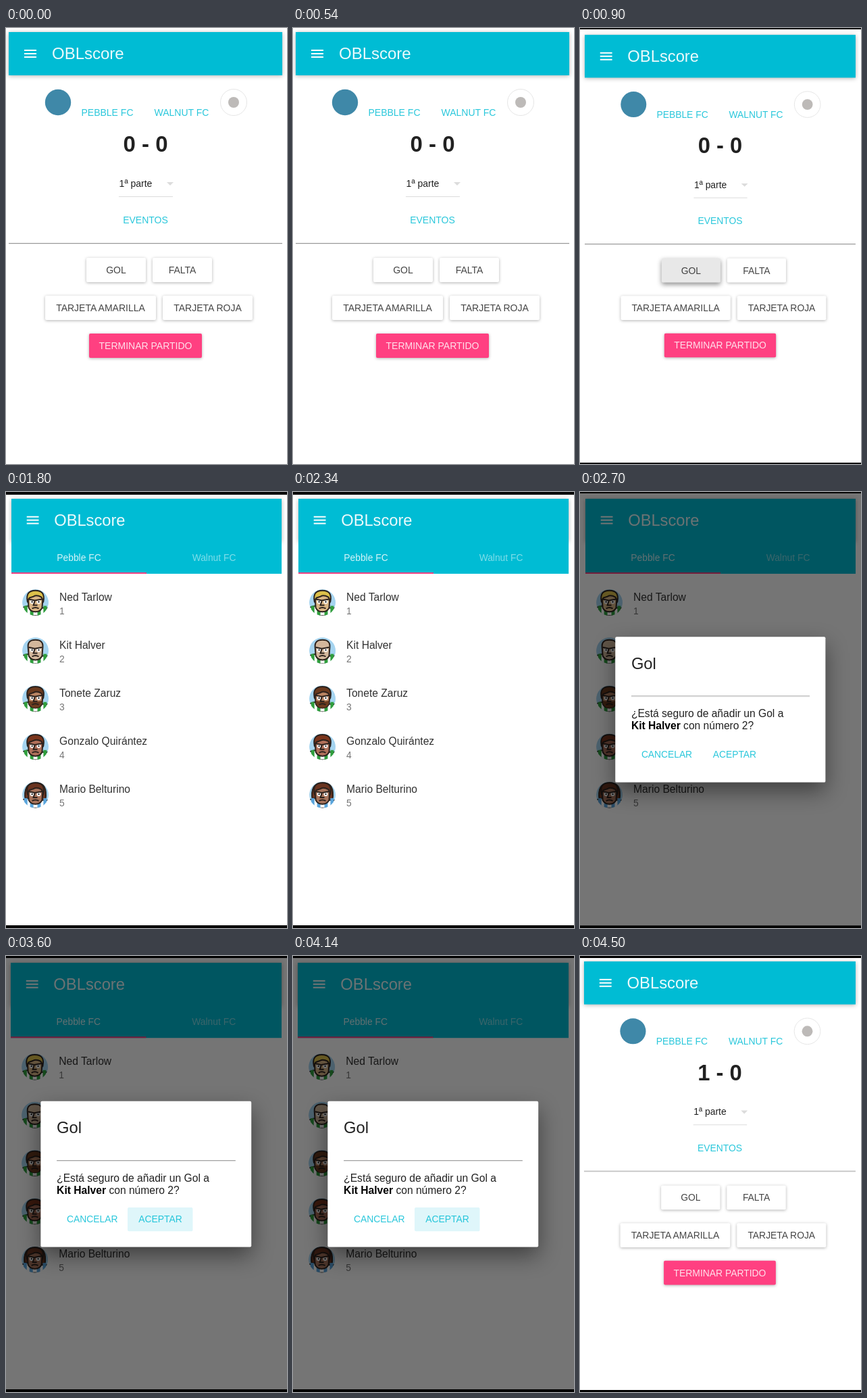
These frames come from a looping animation (416 px wide and 645 px high, 5.4 s). An HTML page:

```html
<!DOCTYPE html>
<html lang="es">
<head>
<meta charset="utf-8">
<title>Marcador</title>
<style>
  html, body { margin: 0; width: 100%; height: 100%; overflow: hidden; background: #fff; }
  svg { display: block; width: 416px; height: 645px; font-family: "Liberation Sans", Arial, sans-serif; }
  .bar { filter: drop-shadow(0 1px 3px rgba(0,0,0,.3)); }
  .raised { filter: drop-shadow(0 1px 2px rgba(0,0,0,.3)); }
  .pressed { filter: drop-shadow(0 3px 4px rgba(0,0,0,.45)); }
  .dialog { filter: drop-shadow(0 13px 16px rgba(0,0,0,.45)); }
  .thin { fill-opacity: .84; }
  .dim { fill-opacity: .5; }
</style>
</head>
<body>
<svg id="stage" viewBox="0 0 416 645"></svg>
<script>
const CYAN = '#00bcd4', PINK = '#ff4081', INK = '#212121';
const LOOP = 5400, HOLD = 900;
const APP = 'OBLscore', TEAMS = ['Pebble FC', 'Walnut FC'];

const players = [
  { name: 'Ned Tarlow', skin: '#d9b585', hair: '#dcc04a', style: 'fringe' },
  { name: 'Kit Halver', skin: '#d3b79c', style: 'bald' },
  { name: 'Tonete Zaruz', skin: '#b98462', hair: '#6b3a1e', style: 'beard' },
  { name: 'Gonzalo Quirántez', skin: '#b0705a', hair: '#7a351c', style: 'fringe' },
  { name: 'Mario Belturino', skin: '#a8745c', hair: '#6a3420', style: 'long', shirt: '#5aa5dc' },
];

const rect = (x, y, w, h, fill, more = '') =>
  `<rect x="${x}" y="${y}" width="${w}" height="${h}" fill="${fill}" ${more}/>`;
const circle = (x, y, r, fill, more = '') =>
  `<circle cx="${x}" cy="${y}" r="${r}" fill="${fill}" ${more}/>`;
const path = (d, fill, more = '') => `<path d="${d}" fill="${fill}" ${more}/>`;
const text = (x, y, size, fill, label, more = '') =>
  `<text x="${x}" y="${y}" font-size="${size}" fill="${fill}" ${more}>${label}</text>`;
const centred = (x, y, label, fill, size = 14, more = 'class="thin"') =>
  text(x, y, size, fill, label, 'text-anchor="middle" ' + more);

const rule = (x, y, w) => rect(x, y, w, 1, '#999') + rect(x, y + 1, w, 1, '#e6e6e6');

const button = (x, y, w, label, fill = '#fff', ink = INK, cls = 'raised') =>
  rect(x, y, w, 36, fill, `rx="2" class="${cls}"`) + centred(x + w / 2, y + 23, label, ink);

const appBar = () =>
  rect(4, 6, 405, 64, CYAN, 'class="bar"') +
  [32, 37, 42].map(y => rect(27, y, 18, 2, '#fff')).join('') +
  text(68, 46, 24, '#fff', APP, 'fill-opacity=".92"');

function matchScreen({ goals, pressed }) {
  return appBar() +
    circle(77, 110, 19.2, '#3f88a8') +
    circle(337, 110, 19.5, '#fff', 'stroke="#e6e6e6"') + circle(337, 110, 8, '#bdbab8') +
    centred(150, 130, TEAMS[0].toUpperCase(), CYAN) +
    centred(260, 130, TEAMS[1].toUpperCase(), CYAN) +
    centred(206.5, 183, goals + ' - 0', INK, 33, 'font-weight="bold"') +
    text(167.6, 235, 14, INK, '1ª parte') +
    path('M238 228h10l-5 5z', '#dcdcdc') +
    rect(167, 249, 80, 1, '#dcdcdc') +
    centred(206.5, 289, 'EVENTOS', CYAN) +
    rule(4, 318, 405) +
    (pressed ? button(119, 340, 88, 'GOL', '#e8e8e8', INK, 'pressed') : button(119, 340, 88, 'GOL')) +
    button(217, 340, 88, 'FALTA') +
    button(58, 396, 164, 'TARJETA AMARILLA') +
    button(232, 396, 133, 'TARJETA ROJA') +
    button(123, 452, 167, 'TERMINAR PARTIDO', PINK, '#fff');
}

function avatar({ skin, hair, style, shirt = '#2f9e3d' }) {
  const line = 'stroke="#2b211c" stroke-width="2"';
  const stripes = [-17, -8, 3, 12].map(x => rect(x, 5, 5, 16, shirt)).join('');
  const hairBack = style === 'long' ? path('M-15 8Q-19-17 0-18T15 8z', hair, line) : '';
  const beard = style === 'beard' ? path('M-10 3Q0 6 10 3Q9 14 0 14T-10 3z', hair) : '';
  const hairTop = style === 'bald' ? '' : path('M-12-2Q-15-18 0-18T12-2L9-8Q2-12-3-9L-9-7z', hair, line);
  return circle(0, 0, 20, '#a5d4f0') + hairBack +
    path('M-20 20V8Q-10 3 0 6T20 8V20z', '#fff', line) + stripes +
    path('M-11-5Q-12-16 0-16T11-5L10 8Q7 14 0 14T-10 8z', skin, line) + beard + hairTop +
    [-5, 5].map(x => circle(x, -1, 3, '#fff') + circle(x, -1, 1.2, '#222')).join('') +
    path('M-10-5L-1-3L10-5M-5 9Q0 6 5 9M-1-2L-3 4H3', 'none', line);
}

const playerRow = (player, i) => {
  const y = 161.4 + 72 * i;
  return `<g transform="translate(40 ${y})" clip-path="url(#round)">${avatar(player)}</g>` +
    text(76, y - 2.6, 15.8, INK, player.name, 'fill-opacity=".92"') +
    text(76, y + 17.6, 14, '#757575', i + 1);
};

const playerList = () =>
  appBar() +
  rect(4, 69, 405, 49.3, CYAN) +
  rect(4, 116.3, 202.5, 2, PINK) +
  centred(105.25, 99, TEAMS[0], '#fff') +
  centred(307.75, 99, TEAMS[1], '#fff', 14, 'class="dim"') +
  players.map(playerRow).join('');

const confirmDialog = focused =>
  rect(-20, -20, 480, 700, '#000', 'opacity=".54"') +
  rect(48.8, 212.7, 315, 218.1, '#fff', 'rx="2" class="dialog"') +
  text(72.8, 261, 24, INK, 'Gol') +
  rule(72.8, 301, 267.4) +
  text(72.8, 333, 15.8, INK, '¿Está seguro de añadir un Gol a') +
  text(72.8, 351.2, 15.8, INK, `<tspan font-weight="bold" fill="#000">${players[1].name}</tspan> con número 2?`) +
  (focused ? rect(178.8, 371.6, 97.4, 35.6, '#dff6fa', 'rx="2"') : '') +
  centred(126, 393.7, 'CANCELAR', CYAN) +
  centred(227.7, 393.7, 'ACEPTAR', CYAN);

// Each shot: content, placement (scale, x, y), then the visible rows between the black edges.
const shots = [
  [matchScreen({ goals: 0 }), 1, 0, 0, 0, 645],
  [matchScreen({ goals: 0, pressed: true }), .99, 3.04, 4.2, 2, 643],
  [playerList(), .9877, 4.05, 4.1, 4, 641],
  [playerList() + confirmDialog(false), .9877, 4.05, 4.1, 2, 641.3],
  [playerList() + confirmDialog(true), .99, 3.04, 4.1, 3, 641],
  [matchScreen({ goals: 1 }), .9926, 2, 2.1, 3, 642],
];

const stage = document.getElementById('stage');
let shown = -1;

function render(now) {
  const index = Math.floor(now % LOOP / HOLD);
  if (index !== shown) {
    shown = index;
    const [content, scale, x, y, top, bottom] = shots[index];
    stage.innerHTML =
      `<clipPath id="round">${circle(0, 0, 19.7, '#000')}</clipPath>` +
      `<g transform="translate(${x} ${y}) scale(${scale})">${content}</g>` +
      rect(0, 0, 416, top, '#000') + rect(0, bottom, 416, 645 - bottom, '#000');
  }
}

const start = performance.now();
function tick() {
  render(performance.now() - start);
  requestAnimationFrame(tick);
}
tick();
</script>
</body>
</html>
```
